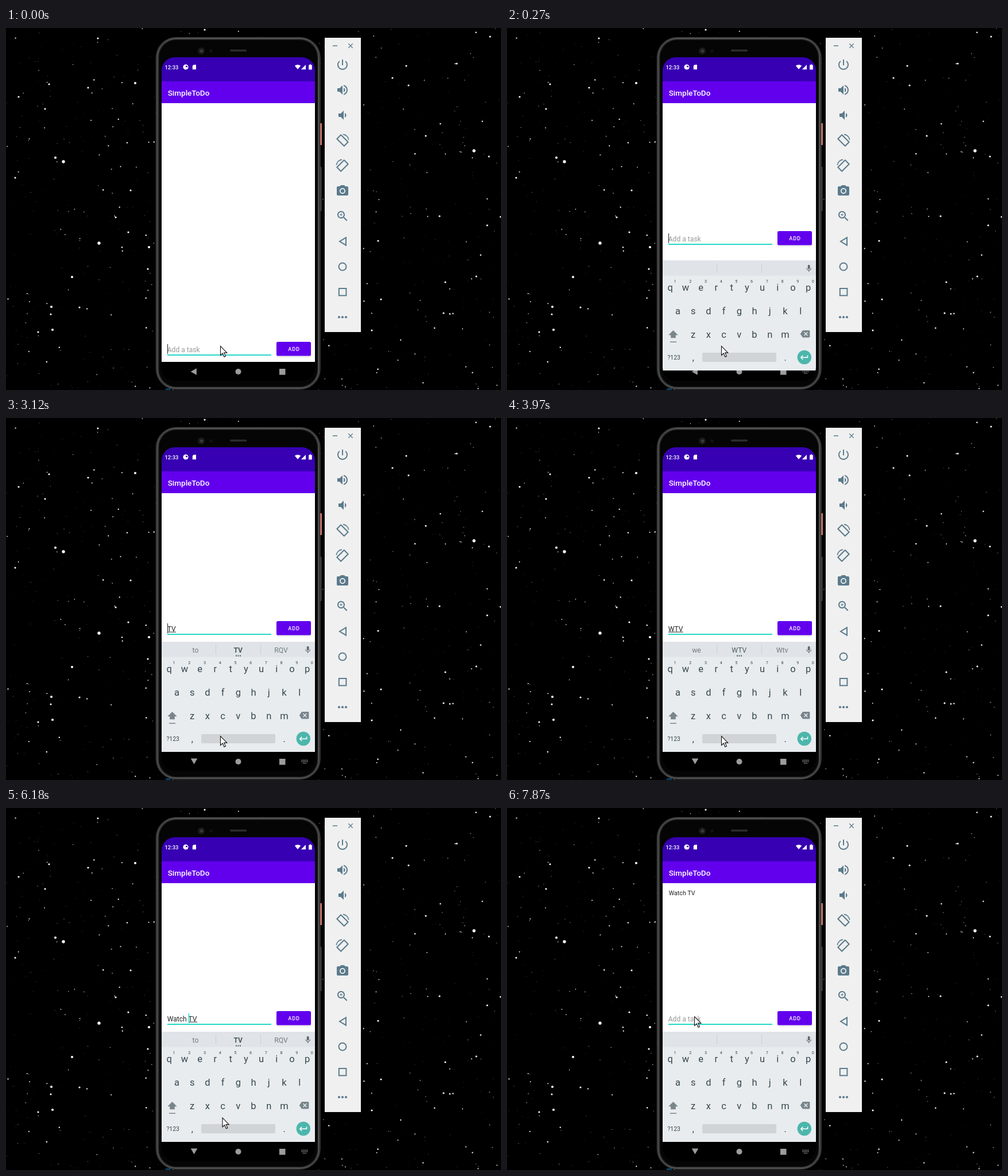
Animation, 862 px wide and 631 px high, one loop 8000 ms. Source, as an HTML page:

```html
<!DOCTYPE html>
<html lang="en">
<head>
<meta charset="utf-8">
<title>To-do list demo</title>
<style>
  html, body { margin: 0; width: 100%; height: 100%; overflow: hidden; background: #000; }
  svg { display: block; width: 862px; height: 631px; }
  text { font-family: Roboto, "Noto Sans", sans-serif; }
  .mid { text-anchor: middle; }
  .medium { font-weight: 500; }
  .line { fill: none; stroke: #5b7b8c; stroke-width: 2; }
</style>
</head>
<body>
<svg viewBox="0 0 862 631">
  <defs>
    <clipPath id="screen"><rect x="271" y="51" width="267" height="564" rx="23"/></clipPath>
    <filter id="soft" x="-20%" y="-50%" width="140%" height="220%"><feGaussianBlur stdDeviation="1.6"/></filter>
    <g id="rotate" class="line">
      <path d="M-2.8-9.7-9.7-2.8 2.8 9.7 9.7 2.8Z" stroke-linejoin="round"/>
      <path d="M1-10.6A11 11 0 0 1 10.7-1" stroke-width="1.7"/>
    </g>
  </defs>
  <rect width="862" height="631"/>
  <g id="stars"></g>

  <!-- phone body -->
  <rect x="546" y="166" width="4" height="38" fill="#d9796b"/>
  <rect x="546" y="242" width="4" height="77" fill="#303030"/>
  <rect x="261.5" y="16.5" width="285.5" height="613" rx="35" fill="#242424" stroke="#565656"/>
  <rect x="264" y="18.5" width="280.5" height="609" rx="32" fill="none" stroke="#777"/>
  <rect x="266.5" y="21" width="275.5" height="604" rx="30" fill="#050505"/>
  <circle cx="340" cy="40" r="6" fill="#1b1b1b"/>
  <circle cx="340.5" cy="40" r="2.6" fill="#3b3b3b"/>
  <circle cx="357" cy="40" r="3" fill="#111"/>
  <rect x="390" y="37.5" width="29" height="3.5" rx="1.5" fill="#2c2c2c"/>
  <rect x="278" y="628" width="9" height="3" fill="#0b3c5c"/>

  <g clip-path="url(#screen)">
    <rect x="271" y="51" width="267" height="43" fill="#3700b3"/>
    <rect x="271" y="93" width="267" height="38" fill="#6200ee"/>
    <rect x="271" y="131" width="267" height="451" fill="#fff"/>
    <rect x="271" y="582" width="267" height="33" fill="#000"/>
    <g fill="#fff">
      <text class="medium" x="276.5" y="71.6" font-size="9.4">12:33</text>
      <circle cx="313" cy="68" r="4.6"/>
      <path d="M313 65.5v2.7h3.4a3.2 3.2 0 0 0-3.4-2.7Z" fill="#3700b3"/>
      <path d="M326.8 64H331v8.3h-6.2V66Z"/>
      <path d="M503 65.6Q508-61.6 508 64Q511 64 513 65.6L508 72Z" visibility="hidden"/>
      <path d="M502.8 65.8Q508 62 513.2 65.8L508 72Z"/>
      <path d="M522 64v8.2h-8.2Z"/>
      <path d="M528.8 63.4h2.3v1h1.7v8h-5.7v-8h1.7Z"/>
      <text class="medium" x="281.7" y="117.9" font-size="13.5">SimpleToDo</text>
    </g>
    <text id="item" x="281.7" y="151.8" font-size="10.7" fill="#222">Watch TV</text>

    <g id="form">
      <text id="entry" x="280.7" y="371.6" font-size="12.1"></text>
      <rect id="spell" y="372.6" height="1" fill="#222"/>
      <rect x="281" y="376.2" width="181" height="1.7" fill="#03d0bd"/>
      <rect id="caret" y="358" width="1.3" height="17"/>
      <rect id="shade" x="471" y="356" width="60" height="24.5" rx="3" filter="url(#soft)"/>
      <rect id="button" x="471" y="354" width="60" height="24.6" rx="2.6"/>
      <text class="mid medium" x="501.6" y="370.1" font-size="9.2" letter-spacing=".8" fill="#fff">ADD</text>
    </g>

    <g fill="#9c9c9c">
      <path id="back"/>
      <circle cx="404.5" cy="599" r="5"/>
      <rect x="476" y="594" width="10.5" height="10.5"/>
      <path id="imeKey" d="M514.5 596.5h11M514.5 599h11M517 601.8h6" fill="none" stroke="#9c9c9c" stroke-width="1.4" stroke-dasharray="1.4 1"/>
    </g>

    <g id="keyboard">
      <rect x="271" y="390" width="267" height="192" fill="#e8ecef"/>
      <rect x="271" y="390" width="267" height="26.5" fill="#e0e4e8"/>
      <path d="M365.5 395v17M443.5 395v17" stroke="#cbd0d4"/>
      <g id="words"></g>
      <path id="dots" d="M400 414.6h9" stroke="#455a64" stroke-width="2" stroke-dasharray="2 1.5"/>
      <path transform="translate(518 396.4) scale(.64)" fill="#5f6a71" d="M12 14c1.66 0 3-1.34 3-3V5c0-1.66-1.34-3-3-3S9 3.34 9 5v6c0 1.66 1.34 3 3 3zm5.3-3c0 3-2.54 5.1-5.3 5.1S6.7 14 6.7 11H5c0 3.41 2.72 6.23 6 6.72V21h2v-3.28c3.28-.48 6-3.3 6-6.72z"/>
      <g id="keys" fill="#37474f"></g>
      <path d="M289.5 512l8.3 8.3h-4v5h-8.6v-5h-4Z" fill="#7b868c"/>
      <path d="M284 532.2h11" stroke="#7b868c" stroke-width="1.5"/>
      <path transform="translate(510.8 510) scale(.69)" fill="#78858c" d="M22 3H7c-.69 0-1.23.35-1.59.88L0 12l5.41 8.11c.36.53.9.89 1.59.89h15c1.1 0 2-.9 2-2V5c0-1.1-.9-2-2-2zm-3 12.59L17.59 17 14 13.41 10.41 17 9 15.59 12.59 12 9 8.41 10.41 7 14 10.59 17.59 7 19 8.41 15.41 12z"/>
      <rect x="340" y="551" width="129" height="16" rx="2" fill="#d0d4d7"/>
      <circle cx="517.8" cy="559" r="12.2" fill="#4db6ac"/>
      <path d="M523.5 555.5v3.7h-11.5M515.2 555.8l-3.4 3.4 3.4 3.4" fill="none" stroke="#fff" stroke-width="1.5"/>
    </g>
  </g>

  <!-- side tool strip -->
  <rect x="555" y="17" width="63" height="513" fill="#f0f0f0"/>
  <path class="line" style="stroke-width:1.3" d="M569 31h8M596.3 27.3l7.4 7.4M603.7 27.3l-7.4 7.4"/>
  <g fill="#5b7b8c">
    <path transform="translate(574 52)" d="M13 3h-2v10h2V3zm4.83 2.17l-1.42 1.42C17.99 7.86 19 9.81 19 12c0 3.87-3.13 7-7 7s-7-3.13-7-7c0-2.19 1.01-4.14 2.58-5.42L6.17 5.17C4.23 6.82 3 9.26 3 12c0 4.97 4.03 9 9 9s9-4.03 9-9c0-2.74-1.23-5.18-3.17-6.83z"/>
    <path transform="translate(574 96)" d="M3 9v6h4l5 5V4L7 9H3zm13.5 3c0-1.77-1.02-3.29-2.5-4.03v8.05c1.48-.73 2.5-2.25 2.5-4.02zM14 3.23v2.06c2.89.86 5 3.54 5 6.71s-2.11 5.85-5 6.71v2.06c4.01-.91 7-4.49 7-8.77s-2.99-7.86-7-8.77z"/>
    <path transform="translate(574 140)" d="M18.5 12c0-1.77-1.02-3.29-2.5-4.03v8.05c1.48-.73 2.5-2.25 2.5-4.02zM5 9v6h4l5 5V4L9 9H5z"/>
    <path transform="translate(574 272)" d="M9 2L7.17 4H4c-1.1 0-2 .9-2 2v12c0 1.1.9 2 2 2h16c1.1 0 2-.9 2-2V6c0-1.1-.9-2-2-2h-3.17L15 2H9zm3 15c-2.76 0-5-2.24-5-5s2.24-5 5-5 5 2.24 5 5-2.24 5-5 5z"/>
    <circle cx="586" cy="284" r="3.2"/>
    <path transform="translate(574 316)" d="M15.5 14h-.79l-.28-.27C15.41 12.59 16 11.11 16 9.5 16 5.91 13.09 3 9.5 3S3 5.91 3 9.5 5.91 16 9.5 16c1.61 0 3.09-.59 4.23-1.57l.27.28v.79l5 4.99L20.49 19l-4.99-5zm-6 0C7.01 14 5 11.99 5 9.5S7.01 5 9.5 5 14 7.01 14 9.5 11.99 14 9.5 14zm2.5-4h-2v2H9v-2H7V9h2V7h1v2h2v1z"/>
    <circle cx="580" cy="504" r="2.1"/><circle cx="586" cy="504" r="2.1"/><circle cx="592" cy="504" r="2.1"/>
  </g>
  <use href="#rotate" x="586" y="196"/>
  <use href="#rotate" transform="translate(586 240) scale(-1 1)"/>
  <path class="line" d="M592 365.3v13.4l-11-6.7Z"/>
  <circle class="line" cx="586" cy="416" r="6.5"/>
  <rect class="line" x="579.8" y="454" width="12.6" height="12.4"/>

  <path id="pointer" d="M0 0V16l3.7-3.5 2.7 6.2 2.5-1.1-2.7-6H11.3Z" fill="#fff" stroke="#111" stroke-width="1.1"/>
</svg>
<script>
const NS = "http://www.w3.org/2000/svg";
const $ = id => document.getElementById(id);
const LOOP = 8000;

function add(parent, tag, attrs, text) {
  const el = document.createElementNS(NS, tag);
  for (const k in attrs) el.setAttribute(k, attrs[k]);
  if (text) el.textContent = text;
  return parent.appendChild(el);
}
const set = (id, attrs) => { for (const k in attrs) $(id).setAttribute(k, attrs[k]); };
const show = (id, on) => $(id).setAttribute("visibility", on ? "visible" : "hidden");

// Bright stars as x, y pairs; the first few are largest.
const BRIGHT = [
  100, 233, 815, 214, 162, 375, 81, 526, 79, 486, 115, 434, 249, 382, 225, 96,
  86, 226, 346, 3, 673, 87, 701, 100, 843, 15, 697, 66, 731, 188, 755, 328,
  838, 344, 648, 371, 637, 527, 653, 473, 762, 497, 765, 443, 819, 433, 16, 261,
  68, 141, 78, 499, 56, 530, 128, 487, 191, 330, 213, 356, 75, 98, 160, 18,
  143, 104, 217, 283, 785, 62, 22, 120, 841, 224, 247, 420
];

function drawStars() {
  let seed = 4177;
  const rnd = () => (seed = seed * 16807 % 2147483647) / 2147483647;
  const star = (x, y, r, level) =>
    add($("stars"), "circle", { cx: x, cy: y, r, fill: `rgb(${level},${level},${level})` });
  for (let i = 0; i < 720; i++) {
    const x = rnd() * 862, y = rnd() * 631, size = rnd();
    star(x.toFixed(1), y.toFixed(1), (0.4 + 0.9 * size ** 3).toFixed(2), Math.round(90 + 160 * size));
  }
  for (let i = 0; i < BRIGHT.length; i += 2)
    star(BRIGHT[i], BRIGHT[i + 1], i < 6 ? 2.7 : i < 18 ? 2.1 : 1.6, 250);
}

function drawKeys() {
  const key = (x, y, size, label) =>
    add($("keys"), "text", { x, y, "font-size": size, class: "mid" }, label);
  const row = (letters, x, y) => [...letters].forEach((c, i) => key(x + i * 26.7, y, 16.5, c));
  row("qwertyuiop", 284.3, 443);
  row("asdfghjkl", 297.6, 483.5);
  row("zxcvbnm", 324.2, 524.5);
  [..."1234567890"].forEach((c, i) => key(292.6 + i * 26.7, 428.5, 7.3, c));
  key(290.6, 563, 10.4, "?123");
  key(324.3, 565, 16, ",");
  key(484.6, 565, 16, ".");
}

const HIDDEN = 300;
const TV_WORDS = ["to", "TV", "RQV"];
// Each row changes some of the state from its time on.
const STEPS = [
  [0, { raised: false, slide: HIDDEN, down: false, text: "", head: 0, from: 0, words: [], caret: true,
        pointer: [373.5, 554.5], press: 0, item: false }],
  [150, { raised: true, slide: 90 }],
  [270, { slide: 15 }],
  [420, { slide: 0, down: true }],
  [560, { text: "T", head: 1 }],
  [700, { text: "TV", head: 2 }],
  [830, { words: TV_WORDS }],
  [1370, { caret: false }],
  [1640, { caret: true, head: 1 }],
  [1930, { head: 0 }],
  [2520, { caret: false }],
  [3120, { caret: true }],
  [3420, { text: "WTV", head: 1 }],
  [3570, { words: ["we", "WTV", "Wtv"] }],
  [3970, { caret: false }],
  [4250, { caret: true, text: "WaTV", head: 2 }],
  [4400, { words: ["watt", "WaTV", "Watt"] }],
  [4850, { text: "WatTV", head: 3 }],
  [5000, { text: "WatcTV", head: 4, words: ["watt", "WatTV", "Watts"] }],
  [5150, { text: "WatchTV", head: 5 }],
  [5300, { words: ["watches", "WatchTV", "Watched"] }],
  [5600, { text: "Watch TV", head: 6, from: 6 }],
  [5750, { words: TV_WORDS }],
  [6180, { pointer: [377, 540] }],
  [6320, { pointer: [395, 482], caret: false }],
  [6460, { pointer: [424, 408] }],
  [6590, { pointer: [454, 352] }],
  [6730, { pointer: [473, 336], caret: true }],
  [6870, { pointer: [486, 350] }],
  [7000, { pointer: [495, 368] }],
  [7140, { press: 1 }],
  [7290, { item: true, text: "", head: 0, from: 0, press: 0.5 }],
  [7440, { words: [], press: 0 }],
  [7580, { pointer: [440, 366] }],
  [7730, { pointer: [362, 364] }],
  [7870, { pointer: [326.5, 363.5], caret: false }]
];

const ruler = document.createElement("canvas").getContext("2d");
function widthOf(text) {
  ruler.font = '12.1px Roboto, "Noto Sans", sans-serif';
  return ruler.measureText(text).width;
}

function drawForm(s) {
  set("form", { transform: `translate(0 ${s.raised ? 0 : 193})` });
  $("entry").textContent = s.text || "Add a task";
  set("entry", { fill: s.text ? "#222" : "#999" });
  const left = widthOf(s.text.slice(0, s.from));
  set("spell", { x: 281 + left, width: widthOf(s.text) - left });
  set("caret", { x: 280.8 + widthOf(s.text.slice(0, s.head)), fill: s.head ? "#03d0bd" : "#444" });
  show("caret", s.caret);
  set("button", { fill: ["#6200ee", "#7620f0", "#893df2"][s.press * 2] });
  set("shade", { fill: "#000", opacity: 0.12 + 0.25 * s.press });
}

function drawWords(words) {
  $("words").replaceChildren();
  words.forEach((word, i) => {
    const strong = i === 1 && word === "TV";
    add($("words"), "text", {
      x: [330, 404.3, 479][i], y: 408.6, class: "mid", "font-size": 12.2,
      "font-weight": strong ? 700 : 400, fill: i === 1 ? "#4a5960" : "#717c82"
    }, word);
  });
  show("dots", words.length);
}

function draw(s) {
  drawForm(s);
  drawWords(s.words);
  set("keyboard", { transform: `translate(0 ${s.slide})` });
  set("back", { d: s.down ? "M321.7 593.5h11.6l-5.8 10Z" : "M331.8 593.3v11.4l-10.2-5.7Z" });
  show("imeKey", s.raised);
  show("item", s.item);
  set("pointer", { transform: `translate(${s.pointer})` });
}

let last = -1;
function tick() {
  const t = performance.now() % LOOP;
  const count = STEPS.filter(([at]) => at <= t).length;
  if (count !== last) {
    last = count;
    draw(Object.assign({}, ...STEPS.slice(0, count).map(step => step[1])));
  }
  requestAnimationFrame(tick);
}

drawStars();
drawKeys();
tick();
</script>
</body>
</html>
```
